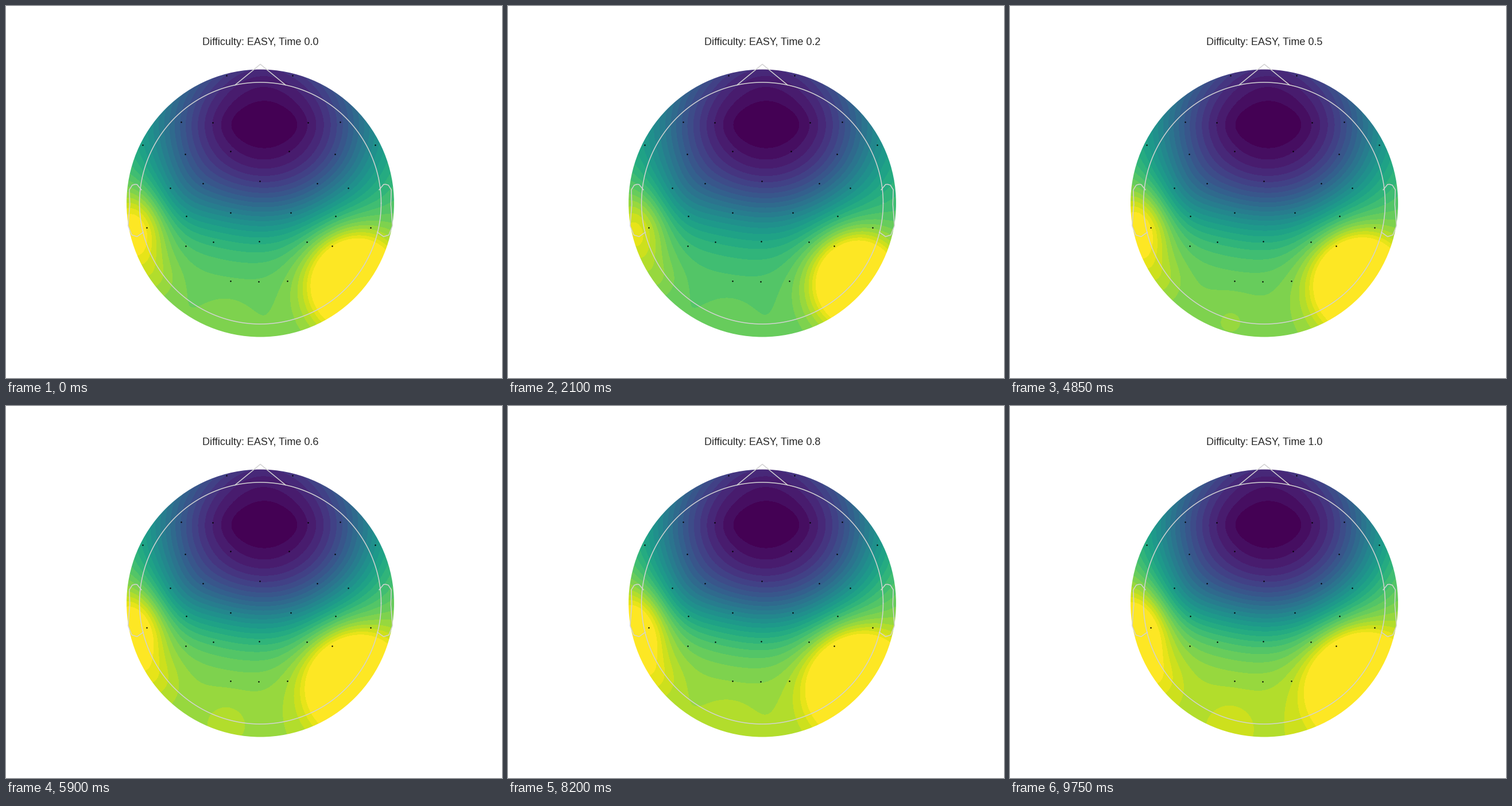
These frames come from a looping animation (864 by 648 pixels, 10000 ms). A matplotlib script:

```python
import numpy as np
import matplotlib.pyplot as plt
from matplotlib.animation import FuncAnimation
from matplotlib.patches import Circle

W, H, DPI = 864, 648, 108
STEP, LOOP = 50, 10000
CX, CY = 443, 343.5
DISK, HEAD = 233, 210.5
BANDS = 27

# Electrode pairs (left x, right x, shared y) and the midline (x, y)
PAIRS = [
    (383, 498, 120), (304.5, 581, 201.5), (359, 525, 202), (237, 642, 241),
    (311.5, 572.5, 257.5), (390, 492, 252), (285, 595.5, 316),
    (342, 541, 308.5), (313, 573, 365), (390, 495, 359),
    (244, 634.5, 385), (312, 567, 417.5), (360, 523.5, 410),
    (390, 489.5, 478.5),
]
MIDLINE = [(441, 304.5), (440.5, 409), (439.5, 479.5)]

# The map is redrawn every 100 ms within these spans and rests between them
BURSTS = [(300, 1200), (1400, 2100), (2400, 3350), (3450, 4150), (4450, 5300),
          (5500, 5600), (5900, 6900), (7000, 7650), (7950, 8850), (9000, 9750)]
UPDATES = np.concatenate([[0]] + [np.arange(a, b + 1, 100) for a, b in BURSTS])

# Level of the back of the head over time
KEY_TIMES = [0, 2100, 3650, 5900, 7000, 8200, 9750]
KEY_DRIFT = [0, -.04, -.04, .065, .095, .08, .11]

left, right, top, bottom = 209, 677, 110, 577
X, Y = np.meshgrid(np.arange(left, right) + .5, np.arange(top, bottom) + .5)


def bump(x, y, sx, sy):
    return np.exp(-((X - x) / sx) ** 2 / 2 - ((Y - y) / sy) ** 2 / 2)


# Activity rises away from a frontal low and levels off towards the back
distance = np.hypot((X - 450) / 1.15, Y - 207)
rise = 1 / (1 + np.exp(-(distance - 145) / 44))
left_lobe = bump(225, 388, 38, 52)
base = (-.05 + .845 * rise
        + .64 * bump(605, 478, 51, 56)     # right rear peak
        + .30 * left_lobe
        + .06 * bump(262, 475, 30, 30)     # left rear
        + .03 * bump(385, 545, 28, 28)     # rear rim
        - .07 * bump(300, 335, 45, 45)     # left centre
        - .035 * bump(450, 207, 50, 18)    # widens the low
        - .03 * bump(443, 108, 60, 25))    # front rim


def field(t):
    drift = np.interp(t, KEY_TIMES, KEY_DRIFT)
    return base + drift * rise ** 3 + 1.2 * min(drift, 0) * left_lobe


fig = plt.figure(figsize=(W / DPI, H / DPI), dpi=DPI, facecolor="white")
ax = fig.add_axes([0, 0, 1, 1])
half = .5 / (BANDS - 1)
scalp = ax.imshow(base, cmap=plt.get_cmap("viridis", BANDS),
                  vmin=-half, vmax=1 + half, interpolation="nearest",
                  extent=(left, right, bottom, top), aspect="auto")
ax.set_xlim(0, W)
ax.set_ylim(H, 0)
ax.axis("off")
scalp.set_clip_path(Circle((CX, CY), DISK, transform=ax.transData))

# Head outline, nose and ears, in units of the head radius
outline = dict(color="lightgrey", lw=1, zorder=3)
turn = np.linspace(0, 2 * np.pi, 201)
ax.plot(CX + HEAD * np.cos(turn), CY + HEAD * np.sin(turn), **outline)
ax.plot(CX + HEAD * np.array([-.209, 0, .209]),
        CY - HEAD * np.array([.978, 1.15, .978]), **outline)
ear_x = 2 * HEAD * np.array([.492, .510, .518, .5299, .5419,
                             .54, .547, .532, .510, .484])
ear_y = 2 * HEAD * np.array([.0555, .0775, .0783, .0746, .0555,
                             -.0055, -.0932, -.1313, -.1384, -.1199])
for side in (-1, 1):
    ax.plot(CX + side * ear_x, CY - ear_y, **outline)

dots = MIDLINE + [(x, y) for a, b, y in PAIRS for x in (a, b)]
dot_x, dot_y = np.array(dots).T + .5
ax.scatter(dot_x, dot_y, s=2.6, c="black", linewidths=0, zorder=4)
title = ax.text(CX, 68, "", family="Liberation Sans", fontsize=12,
                color="0.15", ha="center", va="baseline")


def draw(i):
    t = UPDATES[UPDATES <= i * STEP].max()
    scalp.set_data(field(t))
    title.set_text(f"Difficulty: EASY, Time {t / LOOP:.1f}")
    return scalp, title


anim = FuncAnimation(fig, draw, frames=LOOP // STEP, interval=STEP,
                     repeat=True, repeat_delay=0)
plt.show()
```
